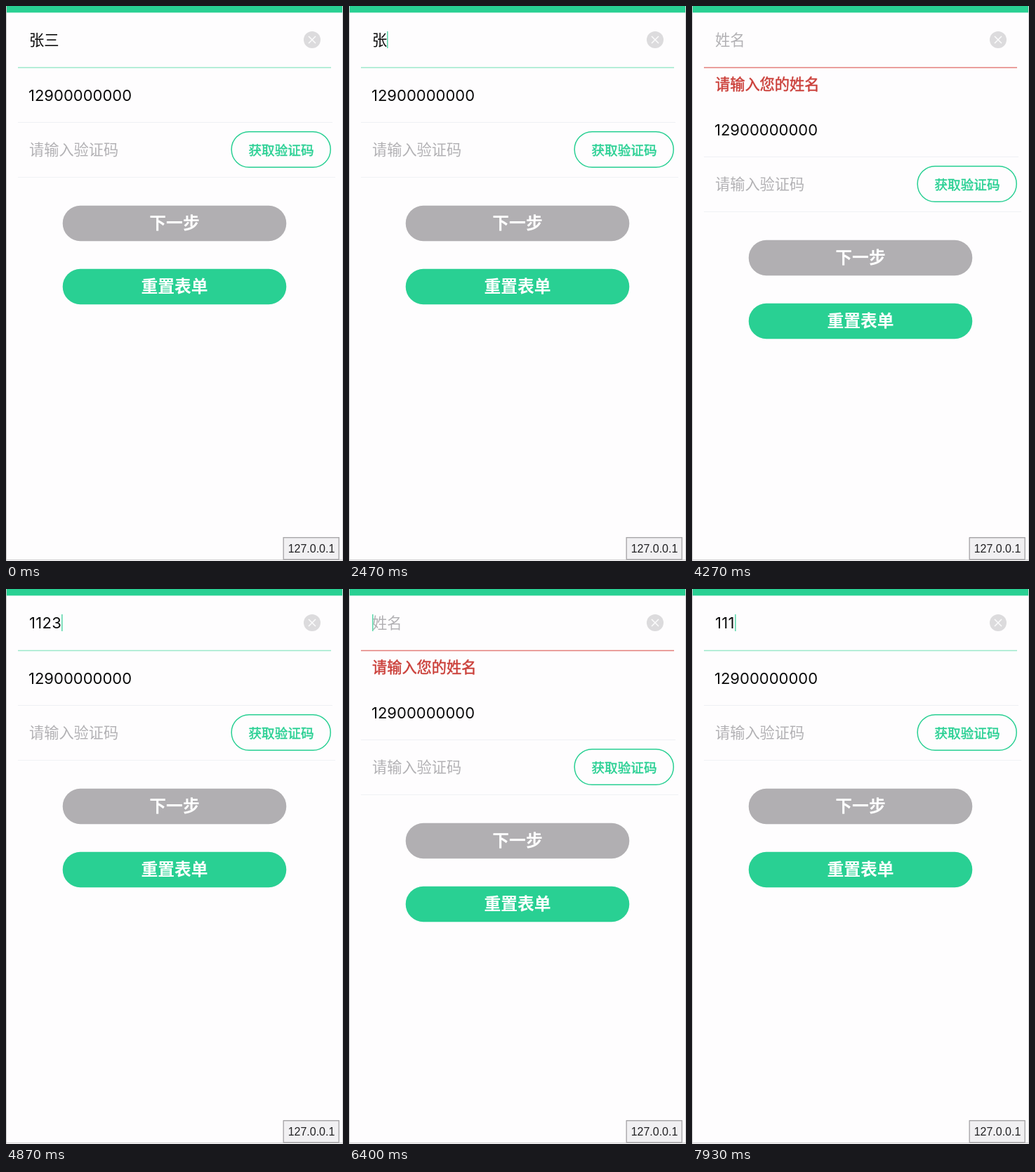
An HTML page with a canvas that plays this animation: 480x789 px, repeating every 8 s.

```html
<!DOCTYPE html>
<html lang="zh">
<head>
<meta charset="utf-8">
<title>表单</title>
<style>
  html, body { margin: 0; width: 100%; height: 100%; overflow: hidden; background: #fefdfe; }
  canvas { display: block; }
</style>
</head>
<body>
<canvas id="stage" width="480" height="789"></canvas>
<script>
const ctx = document.getElementById('stage').getContext('2d');
const LOOP = 8000;
const GREEN = '#29d093', GREY = '#b1afb2', HINT = '#b2b1b4', INK = '#0c0c0c', RED = '#cb403b';
const CJK = '"Noto Sans CJK SC", "Noto Sans CJK", sans-serif';
const DIGITS = 'Inter, sans-serif';

// Each edit: start time, field value; the caret restarts its blink there.
const edits = [
  [70, '张三'], [2330, '张'], [2530, ''],
  [4400, '1'], [4470, '11'], [4600, '112'], [4670, '1123'],
  [5000, '11231'], [5070, '112311'], [6270, ''],
  [7130, '1'], [7270, '11'], [7470, '111']
];

function text(str, x, y, size, color, { weight = 400, family = CJK, align = 'left', spacing = 0, swell = 0 } = {}) {
  ctx.font = `${weight} ${size}px ${family}`;
  ctx.letterSpacing = `${spacing}px`;
  ctx.textAlign = align;
  ctx.fillStyle = ctx.strokeStyle = color;
  ctx.fillText(str, x, y);
  if (swell) {
    // A thin outline stands in for a medium weight.
    ctx.lineWidth = swell;
    ctx.lineJoin = 'round';
    ctx.strokeText(str, x, y);
  }
  return ctx.measureText(str).width;
}

function rect(x, y, w, h, color) {
  ctx.fillStyle = color;
  ctx.fillRect(x, y, w, h);
}

function pill(x, y, w, h, r) {
  ctx.beginPath();
  ctx.roundRect(x, y, w, h, r);
}

function button(label, y, color) {
  pill(80.7, y - 0.2, 318.6, 50.4, 25.2);
  ctx.fillStyle = color;
  ctx.fill();
  text(label, 240, y + 33, 23.8, '#fff', { weight: 700, align: 'center' });
}

function clearIcon(x, y) {
  ctx.beginPath();
  ctx.arc(x, y, 12, 0, Math.PI * 2);
  ctx.fillStyle = '#dcdbdd';
  ctx.fill();
  ctx.beginPath();
  for (const s of [-1, 1]) {
    ctx.moveTo(x - 5, y - 5 * s);
    ctx.lineTo(x + 5, y + 5 * s);
  }
  ctx.strokeStyle = '#fbfbfb';
  ctx.lineWidth = 1.5;
  ctx.stroke();
}

function nameField(value, caretOn) {
  const empty = !value;
  let width = 0;
  if (empty) text('姓名', 33, 56, 21.3, HINT);
  else if (/\d/.test(value)) width = text(value, 33, 56, 22, INK, { family: DIGITS, spacing: 0.3 });
  else width = text(value, 33, 56, 21.3, INK);
  if (caretOn) rect(Math.round(33 + width), 36, 1.6, 24, '#62d9ae');
  clearIcon(436, 48);
  rect(17, 86.8, 446, 1.5, empty ? '#e37f7b' : '#9ce8cb');
  if (empty) text('请输入您的姓名', 33, 119, 21.2, RED, { swell: 0.5 });
}

function lowerForm() {
  text('12900000000', 32, 134.5, 22, INK, { family: DIGITS });
  rect(17, 165, 448, 1, '#eef0f4');
  text('请输入验证码', 33, 212, 21.2, HINT);
  pill(321.2, 178.7, 141, 50.6, 25);
  ctx.strokeStyle = GREEN;
  ctx.lineWidth = 1.5;
  ctx.stroke();
  text('获取验证码', 392, 212, 18.6, GREEN, { align: 'center', swell: 0.5 });
  rect(17, 243, 452, 1, '#f0f2f5');
  button('下一步', 284, GREY);
  button('重置表单', 374, GREEN);
}

function chrome() {
  rect(0, 0, 1, 789, '#c9c8ca');
  rect(479, 0, 1, 789, '#d2d1d3');
  rect(0, 787, 480, 1, '#c9c8ca');
  rect(1, 0, 478, 9.4, GREEN);
  rect(395, 755, 80, 32, '#f1f0f2');
  ctx.strokeStyle = '#a9a8aa';
  ctx.lineWidth = 1.4;
  ctx.strokeRect(395.2, 755.7, 79, 31);
  text('127.0.0.1', 435, 777, 16, '#222224', { family: '"Liberation Sans", sans-serif', align: 'center' });
}

function draw(t) {
  const [start, value] = edits.findLast(e => e[0] <= t) || edits[0];
  const caretOn = t >= start && (t - start) % 1000 < 500;

  rect(0, 0, 480, 789, '#fefdfe');
  nameField(value, caretOn);
  ctx.save();
  if (!value) ctx.translate(0, 49);
  lowerForm();
  ctx.restore();
  chrome();
}

function tick() {
  draw(performance.now() % LOOP);
  requestAnimationFrame(tick);
}
tick();
</script>
</body>
</html>
```
